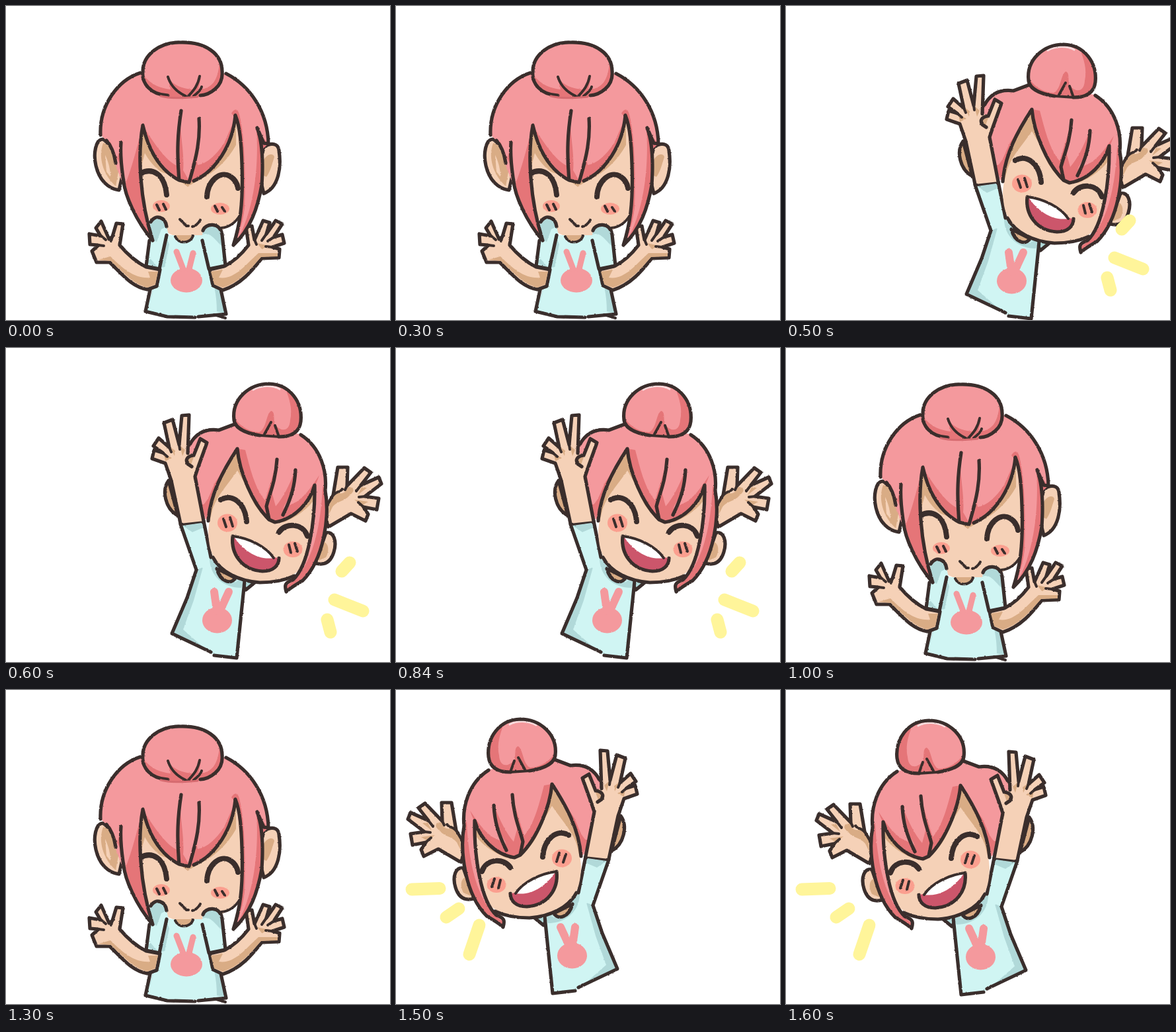
Write an HTML page that moves like this. It is 581x474 px and loops after 2 s.

```html
<!DOCTYPE html>
<html lang="en">
<head>
<meta charset="utf-8">
<title>Cheering girl</title>
<style>
html, body { margin: 0; width: 100%; height: 100%; overflow: hidden; background: #fff; }
svg { display: block; width: 581px; height: 474px; }
path, ellipse { fill: none; stroke-linecap: round; stroke-linejoin: round; }
.line { stroke: #3a2e2c; stroke-width: 5.2; }
.thin { stroke-width: 4; }
.bold { stroke-width: 8; }
.skin { fill: #f5d1b7; }
.tan { fill: #d9ac85; }
.hair { fill: #f4999d; }
.rose { fill: #e57578; }
.shirt { fill: #d0f5f3; }
.teal { fill: #b1d9d9; }
.blush { fill: #fb9f8f; }
.print { fill: #f4999d; }
.ear { stroke: #f4999d; }
.mouth { fill: #cc566b; }
.teeth { fill: #fff; }
.mark { stroke: #fff59a; stroke-width: 19; }
</style>
</head>
<body>
<svg viewBox="0 0 581 474">
<defs>
  <filter id="crayon" x="-5%" y="-5%" width="110%" height="110%" color-interpolation-filters="sRGB">
    <feTurbulence type="fractalNoise" baseFrequency=".3" numOctaves="2" seed="4"/>
    <feDisplacementMap in="SourceGraphic" scale="2" xChannelSelector="R" yChannelSelector="G"/>
  </filter>
</defs>

<g id="shrug" filter="url(#crayon)">
  <!-- ears -->
  <path class="skin line" d="M147 201C135 201 132 224 136 241C141 263 155 276 171 278L182 230Z"/>
  <path class="tan" d="M147 207C140 225 144 252 166 272L172 240C164 222 156 207 147 207Z"/>
  <path class="skin" d="M150 225C154 233 158 245 158 258L152 250Z"/>
  <path class="skin line" d="M390 213C402 205 412 208 413 218C417 245 412 275 390 283L382 250Z"/>
  <path class="tan" d="M390 232C396 222 405 222 406 228C402 240 400 250 394 258L388 255Z"/>
  <!-- face -->
  <path class="skin" d="M200 175L202 300C214 325 236 345 270 350C307 350 336 338 350 320L362 290L352 165Z"/>
  <path class="tan" d="M207 180L203 248C220 245 240 249 263 264L275 273L289 264C315 252 333 236 348 210L348 170C335 210 308 248 280 260L262 262Z"/>
  <path class="skin" d="M210 222C222 244 240 256 258 263L235 252C220 243 210 245 203 249Z"/>
  <path class="line thin" d="M326 335C338 334 348 326 354 316"/>
  <!-- shirt -->
  <path class="shirt" d="M217 345L218 329C224 315 240 315 243 333L246 346L297 346C298 326 326 324 327 346L332 392L308 397L318 402L333 465L242 470L211 461L231 402L212 393Z"/>
  <path class="teal" d="M217 334C225 315 241 315 243 333L235 337L228 356L219 351ZM297 345C302 326 325 327 326 343L328 363C317 356 311 340 297 345ZM212 386L219 382L232 397L222 427L214 462L225 419L232 400ZM308 398L320 402L333 464L319 461C319 435 314 418 308 398ZM241 345L247 360L240 394L235 395Z"/>
  <path class="tan" d="M256 346H284C282 359 260 360 256 346Z"/>
  <path class="line" d="M219 424L211 461L244 469L286 470M325 428L333 465L291 469"/>
  <path class="line thin" d="M256 348C261 360 279 359 283 347M315 466L332 471"/>
  <ellipse class="print" cx="273" cy="414" rx="24" ry="18.5"/>
  <path class="ear" stroke-width="9" d="M258 371L268 397M283 373L277 397"/>
  <!-- arms -->
  <path class="skin line" d="M233 398L212 394C198 387 183 374 172 361L177 329L167 328L161 348L156 352L144 325L136 335L143 347L126 344L127 360L140 361L130 370L137 387L157 387C176 405 190 424 214 428L228 423Z"/>
  <path class="tan" d="M140 383L158 378C177 397 195 412 218 410L215 401L230 401L226 420L214 425C193 420 177 402 159 385Z"/>
  <path class="line thin" d="M144 347L151 353M140 361L148 362M161 348L159 355"/>
  <path class="skin line" d="M308 398L330 393C345 386 357 374 367 361L363 333L372 332L376 353L389 324L399 327L394 344L408 324L418 329L405 349L418 345L421 358L403 364L414 367L413 380L387 381C375 396 357 420 328 429L313 422Z"/>
  <path class="tan" d="M310 401L328 398L322 410C345 414 362 391 382 373L411 373L411 378L386 379C368 399 352 418 328 425L315 420Z"/>
  <path class="tan" d="M380 358L398 362L387 367Z"/>
  <path class="line thin" d="M376 353L379 360M394 344L387 354M405 349L396 355M403 364L393 363"/>
  <path class="line" d="M219 326C226 314 241 318 243 333M217 354L212 393L232 397L243 346M298 339C301 328 324 325 327 345L332 392L307 397L297 354"/>
  <!-- features -->
  <ellipse class="blush" cx="235" cy="302" rx="13" ry="9"/>
  <ellipse class="blush" cx="324" cy="306" rx="14" ry="9"/>
  <path class="line thin" d="M228 300L232 308M238 299L242 307M316 302L320 310M327 304L331 310"/>
  <path class="line bold" d="M203 253C221 243 240 253 243 285M304 288C305 264 324 248 339 257C347 262 350 268 351 275"/>
  <path class="line thin" d="M263 322L273 332L276 332M282 333C288 332 291 328 294 323"/>
  <!-- hair -->
  <path class="hair" d="M143 195C141 150 169 112 205 100L333 102C370 121 396 160 397 208L388 215C392 265 380 320 344 361C354 330 359 300 357 240C356 207 354 182 347 165C343 210 317 250 284 264L276 267L262 263C235 249 216 220 207 180C199 222 202 292 222 354C196 324 180 285 178 272L166 240C160 217 154 202 143 195Z"/>
  <path class="rose" d="M207 180C216 220 235 249 262 263L261 242C244 237 222 205 207 180ZM264 180C258 210 260 249 265 263L275 267L286 264C320 249 342 210 346 168L341 162C346 154 351 155 353 164C360 190 363 240 361 305C358 330 351 348 344 361C354 330 359 300 357 240L348 166L330 207C318 225 304 238 290 240L286 222L276 262L268 248C270 228 265 202 264 180ZM207 182C198 212 191 245 179 272C185 295 200 326 222 354C203 300 199 222 207 182ZM176 200L166 240L157 203L172 238ZM385 194L397 208L388 216C391 265 380 320 350 353C374 311 383 247 379 185Z"/>
  <path class="line" d="M143 195C141 150 169 112 203 101M333 102C370 121 396 160 397 208L390 207L380 184M380 184C388 205 389 240 387 270C381 304 370 337 344 361C354 330 359 300 357 240C356 207 354 182 347 165C343 210 317 250 284 264M262 263C235 249 216 220 207 180C199 222 202 292 222 354C196 324 180 285 178 265C174 240 173 220 174 206M265 158C260 190 258 220 262 263L275 266M292 170C294 200 289 226 277 266M152 203C160 212 164 224 166 237"/>
  <path class="hair" d="M207 101C207 73 234 54 264 55C302 54 327 72 327 99C329 122 308 136 289 136C258 141 207 137 207 101Z"/>
  <path class="rose" d="M209 105C220 120 235 124 249 126L245 107C253 121 269 125 282 126L295 108L291 126C312 125 320 113 323 87L328 103C326 125 310 135 289 137C260 141 216 139 209 105Z"/>
  <path class="line" d="M245 135C218 134 205 116 207 99C207 73 234 54 264 55C302 54 327 72 327 99C329 122 308 134 294 135"/>
  <path class="line thin" d="M245 107C250 123 261 131 272 136M293 106C290 122 282 129 276 136M296 122C294 129 288 132 284 136"/>
  <path d="M234 136C250 140 272 139 290 137" stroke="#d66b70" stroke-width="3"/>
</g>

<g id="cheer" filter="url(#crayon)">
  <!-- far arm and ears -->
  <path class="skin line" d="M480 248L495 222L502 180L517 180L516 208L542 181L552 188L537 207L564 195L568 205L543 224L564 227L561 244L541 240L548 251L544 261L522 250L488 270Z"/>
  <path class="tan" d="M489 236L501 216C505 224 516 217 517 210C525 209 530 215 520 222C513 232 502 230 494 240L488 252ZM538 210L546 211L532 222ZM527 229L548 232L538 238Z"/>
  <path class="line thin" d="M495 222C502 215 505 218 509 213M516 208L513 214M537 207L530 216M543 224L534 225M541 240L533 233"/>
  <path class="skin line" d="M484 279C496 276 501 292 496 308C491 325 480 328 468 325Z"/>
  <path class="tan" d="M478 292C488 293 490 305 484 316L470 322Z"/>
  <path class="tan line" d="M246 200C235 215 241 243 260 253Z"/>
  <!-- shirt -->
  <path class="teal line" d="M354 350L380 351L363 365Z"/>
  <path class="shirt" d="M264 266L299 261L312 320L361 350L349 468L314 463L251 431L288 335Z"/>
  <path class="teal" d="M264 266L299 261L301 270L282 278ZM288 335L298 331L284 381L268 425L300 453L251 431ZM308 317L320 325C319 352 345 358 352 350L361 353L356 362C329 362 308 344 308 317Z"/>
  <path class="line" d="M264 266L299 261L310 316M264 266L288 335L274 377L251 431L310 459M315 464L349 468L361 352"/>
  <path class="tan line" d="M319 333C324 353 341 358 347 347Z"/>
  <ellipse class="print" cx="319.5" cy="411" rx="22.5" ry="19.5"/>
  <path class="ear" stroke-width="12" d="M315 368L319 397M337 368L324 396"/>
  <!-- face -->
  <path class="skin" d="M350 150C328 190 309 233 306 277C307 314 319 340 365 352C405 359 434 348 454 326L473 260L470 200Z"/>
  <path class="tan" d="M350 151C329 190 310 226 308 262L313 242C320 222 335 207 350 185L366 213C373 238 386 251 400 262L420 263C445 253 460 239 469 225V205L405 250Z"/>
  <path class="skin" d="M350 185L366 213C373 238 386 251 400 262L376 247L356 205Z"/>
  <path class="line" d="M313 316C324 337 351 352 384 354C406 354 421 351 436 344"/>
  <!-- features -->
  <ellipse class="blush" cx="335" cy="264" rx="15" ry="13.5"/>
  <ellipse class="blush" cx="434" cy="304" rx="14.5" ry="12"/>
  <path class="line thin" d="M329 258L333 270M339 256L343 269M428 297L431 309M437 295L441 307"/>
  <path class="line bold" d="M325 229C342 219 362 234 364 262M413 278C423 263 449 264 456 284"/>
  <path class="mouth" d="M343 284C340 310 356 335 388 337C405 337 413 328 413 317C404 318 394 307 378 298Z"/>
  <path class="teeth" d="M345 285C368 287 394 300 405 317C381 321 358 305 345 285Z"/>
  <path class="line" d="M343 284C340 310 356 335 388 337C405 337 413 328 413 317"/>
  <path class="line thin" d="M343 284C368 287 394 300 405 317"/>
  <!-- hair -->
  <path class="hair" d="M276 150C289 125 307 122 322 124L348 114L445 130C476 150 486 186 483 215C490 255 481 319 449 351C438 358 430 362 424 368C421 358 422 354 434 350C458 329 468 260 467 207C460 233 437 258 407 263L398 259C373 235 353 187 350 152C329 184 309 220 306 261L290 250Z"/>
  <path class="rose" d="M350 152C353 187 373 235 398 259L407 263C437 258 460 233 474 192C464 207 455 221 440 232L419 242L435 215L438 183C428 209 419 226 408 239L402 217L411 168C403 194 398 211 392 230C376 211 369 180 362 154ZM347 157C329 184 309 220 306 261L293 240C306 235 310 215 317 202ZM479 208L483 215C490 255 481 319 449 351L424 368L423 360C464 337 477 265 479 208Z"/>
  <path class="line" d="M278 146C289 125 307 122 322 124L346 115M446 131C476 150 486 186 483 215C490 255 481 319 449 351C438 358 430 362 424 368C421 358 422 354 434 350C458 329 468 260 467 207C460 233 437 258 407 263L398 259C373 235 353 187 350 152C329 184 309 220 306 261M410 168C408 202 398 222 394 239L398 258M438 184C437 207 432 226 419 252"/>
  <!-- near arm -->
  <path class="skin" d="M264 265L250 200L241 174L221 166L224 154L236 158L223 148L231 136L247 150L239 113L252 108L262 146L266 102L277 101L277 160L283 160L294 137L304 142L291 179L285 194L300 261Z"/>
  <path class="tan" d="M239 159L251 166L241 171ZM248 149L256 155L255 163ZM263 147L271 154L267 163ZM278 160L285 162L280 176L272 174Z"/>
  <path class="line" d="M264 265L250 200L241 174L221 167L224 154L237 158L223 148L231 136L247 150L239 113L252 108L262 146L266 102L277 101L275 159M294 137L284 162C274 163 271 169 275 175L281 179M294 137L304 143L291 179L286 194L299 261"/>
  <path class="line thin" d="M237 158L244 164M247 150L250 157M262 146L263 153"/>
  <!-- bun -->
  <path class="hair" d="M345 109C341 76 369 54 398 54C430 55 449 82 446 111C444 127 432 135 413 134C390 137 351 130 345 109Z"/>
  <path class="rose" d="M345 104C356 122 373 127 384 127C395 119 393 101 401 95C408 96 404 109 407 116C418 128 429 125 430 109C434 91 428 76 424 64C443 76 449 100 445 114C440 132 427 135 410 134C387 136 349 129 345 104Z"/>
  <path d="M374 63C386 56 403 56 414 62" stroke="#f8dcdd" stroke-width="3"/>
  <path class="line" d="M384 132C365 129 347 122 345 109C341 76 369 54 398 54C430 55 449 82 446 111C444 127 432 134 413 134"/>
  <path class="line thin" d="M401 112L391 130M407 117L413 134M385 132L414 134"/>
</g>

<path id="rightMarks" class="mark" stroke-width="18" d="M520 324L508 337M497 380L540 397M486 410L491 429"/>
<path id="leftMarks" class="mark" d="M24 301L66 299.5M76 343L95 330M126 355L111 399"/>
</svg>
<script>
const LOOP = 2000;
const part = id => document.getElementById(id);
const show = (id, on) => part(id).style.display = on ? "" : "none";

function draw(now) {
  const time = now % LOOP;
  const beat = time % 1000;
  const cheering = beat >= 500;
  const left = time >= 1000;
  const settled = beat >= 600;
  show("shrug", !cheering);
  show("cheer", cheering);
  show("rightMarks", cheering && !left);
  show("leftMarks", cheering && left);
  const place = left
    ? `translate(${settled ? "614 -8" : "586 -10"}) scale(-1 1)`
    : `translate(${settled ? "0 0" : "22 4"})`;
  part("cheer").setAttribute("transform", place);
}

function tick() {
  draw(performance.now());
  requestAnimationFrame(tick);
}
tick();
</script>
</body>
</html>
```
